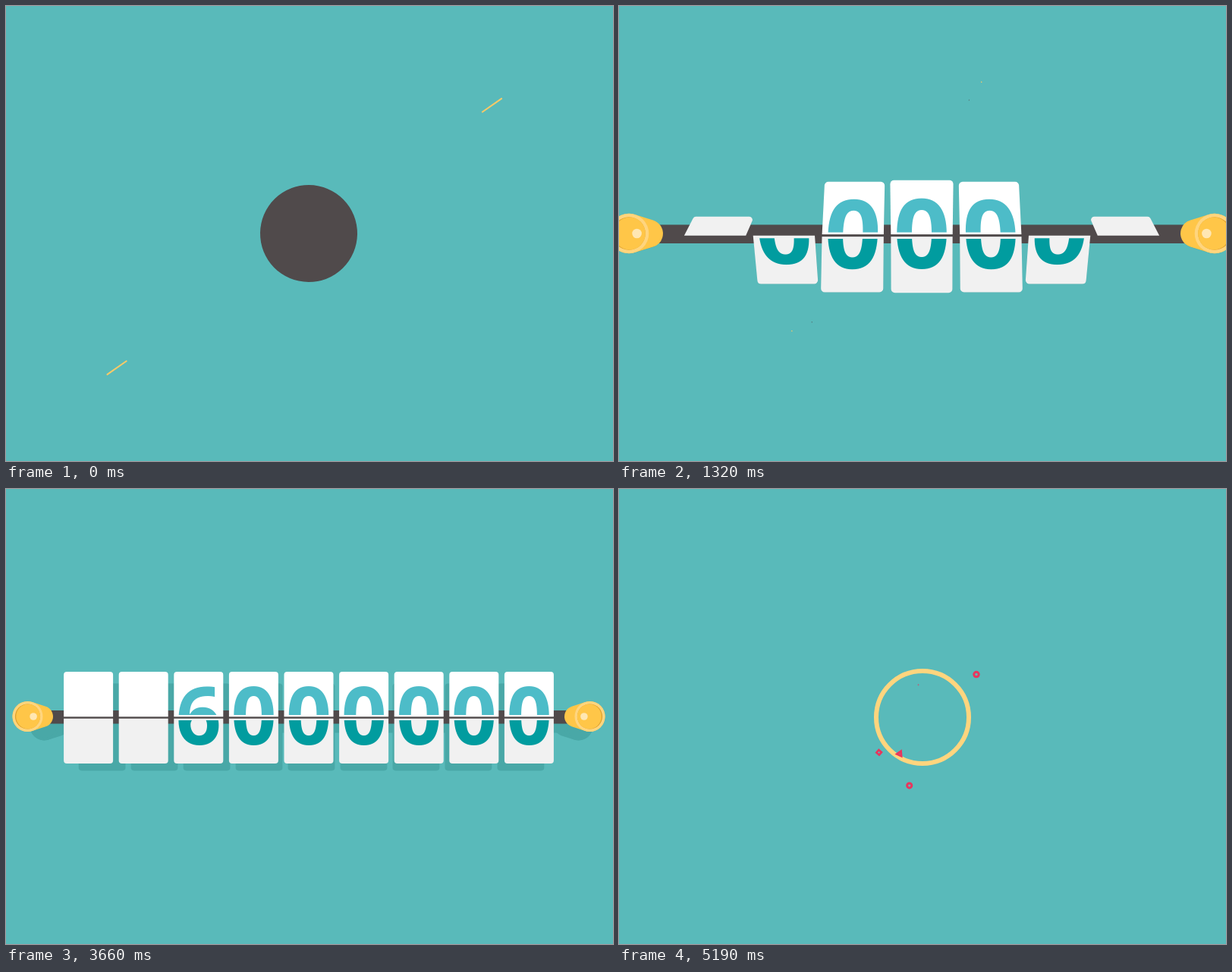
These frames come from a looping animation (800 by 600 pixels, 5.22 s). An HTML page with a canvas:

```html
<!DOCTYPE html>
<html lang="en">
<head>
<meta charset="utf-8">
<title>Flip counter</title>
<style>
html, body { margin: 0; width: 100%; height: 100%; overflow: hidden; background: #59baba; }
canvas { display: block; }
</style>
</head>
<body>
<canvas id="stage" width="800" height="600"></canvas>
<script>
const ctx = document.getElementById('stage').getContext('2d');
const LOOP = 5220, PITCH = 72.6, HALF = 60.5, RAD = Math.PI / 180;
const BG = '#59baba', SHADE = '#49a8a7', DARK = '#504a4b', GOLD = '#ffc648',
      PALE = '#ffd57e', DASH = '#fdca66', PINK = '#e8365d';

const clamp = v => Math.max(0, Math.min(1, v));
const span = (t, a, b) => clamp((t - a) / (b - a));
const outQuad = p => 1 - (1 - p) ** 2;
const inOut = p => (1 - Math.cos(p * Math.PI)) / 2;

// Piecewise linear value from time, value pairs
function key(t, k) {
  if (t <= k[0]) return k[1];
  for (let i = 2; i < k.length; i += 2)
    if (t < k[i]) return k[i - 1] + (k[i + 1] - k[i - 1]) * (t - k[i - 2]) / (k[i] - k[i - 2]);
  return k[k.length - 1];
}

let tint = null;
function fill(color) { ctx.fillStyle = tint || color; ctx.fill(); }
function disc(x, y, r, color) { ctx.beginPath(); ctx.arc(x, y, r, 0, 7); fill(color); }
function poly(points) {
  ctx.beginPath();
  for (let i = 0; i < points.length; i += 2) ctx.lineTo(points[i], points[i + 1]);
  ctx.closePath();
}
// Round-capped line; len includes the caps
function capsule(cx, cy, len, width, angle, color) {
  if (len <= 0) return;
  const w = Math.min(width, len), h = Math.max(.01, (len - w) / 2);
  const dx = Math.cos(angle) * h, dy = Math.sin(angle) * h;
  ctx.beginPath();
  ctx.moveTo(cx - dx, cy - dy);
  ctx.lineTo(cx + dx, cy + dy);
  ctx.lineCap = 'round';
  ctx.lineWidth = w;
  ctx.strokeStyle = tint || color;
  ctx.stroke();
}

// Counter cards
const OPEN_AT = [955, 965, 1130, 1260, 1400];
const OPEN_LOW = [0, 90, 70, 112, 240, 0, 320, -25, 430, 26, 560, 0];
const OPEN_TOP = [200, 90, 280, 56, 400, 0];
const FLIPS = {
  1: [[0, '1'], [2430, '']],
  2: [[0, '0'], [2300, '8'], [3050, '6'], [3800, '4']]
};
const FOUR = [2, -43.5, 18, -43.5, -8, 3, 6.5, 3, 9, -15, 21, -15, 21, 3, 27, 3,
              27, 18, 21, 18, 21, 34.5, 6, 34.5, 6, 18, -26, 18, -26, 5];

function half(i, top, deg, ch) {
  const d = i - 4, x = d * PITCH, cos = Math.cos(deg * RAD), sin = Math.sin(deg * RAD);
  const side = top ? -HALF : HALF, h = side * cos;
  if (Math.abs(h) < .5) return;
  const shear = -(2.2 * d + 3.5 * Math.sign(d)) * sin;
  const flare = (d ? -2.4 / Math.abs(d) : 3) * sin;
  const l = x - 32.5, r = x + 32.5, fl = l + shear - flare, fr = r + shear + flare;
  const round = Math.min(4, Math.abs(h) / 6);
  ctx.beginPath();
  ctx.moveTo(l, 0);
  ctx.arcTo(fl, h, fr, h, round);
  ctx.arcTo(fr, h, r, 0, round);
  ctx.lineTo(r, 0);
  fill(top ? '#fff' : '#f1f1f1');
  if (tint || !ch || cos < 0) return;

  ctx.save();
  ctx.transform(1, 0, shear / side, cos, x, 0);
  ctx.beginPath();
  ctx.rect(-33, top ? -60 : 3.5, 66, 56.5);
  ctx.clip();
  ctx.fillStyle = top ? '#4dbcc8' : '#019c9f';
  if (ch === '4') {
    poly(FOUR);
    ctx.fill();
  } else {
    ctx.font = ch === '1' ? '800 104px "Noto Sans Mono", monospace'
                          : '700 105px "Open Sans", "Noto Sans", sans-serif';
    ctx.textAlign = 'center';
    ctx.fillText(ch, 0, 35);
  }
  ctx.restore();
}

function card(i, t) {
  const age = t - OPEN_AT[Math.abs(i - 4)];
  if (age <= 0) return;
  const seq = FLIPS[i] || [[0, i ? '0' : '']];
  let n = seq.length - 1;
  while (t < seq[n][0]) n--;
  const ch = seq[n][1], f = t - seq[n][0];
  if (n && f < 350) {
    const old = seq[n - 1][1];
    half(i, true, 0, ch);
    if (f < 190) half(i, false, 0, old);
    if (f < 110) half(i, true, 90 * (f / 110) ** 2, old);
    else half(i, false, key(f, [110, 90, 190, 0, 260, 18, 350, 0]), ch);
  } else {
    half(i, true, key(age, OPEN_TOP), ch);
    half(i, false, key(age, OPEN_LOW), ch);
  }
  if (!tint && age > 200) {
    ctx.fillStyle = DARK;
    ctx.fillRect((i - 4) * PITCH - 37, -1.2, 74, 2.4);
  }
}

// Rod end pointing along +x; reach is the length of its neck
function knob(dist, size, turn, reach, glint) {
  ctx.save();
  ctx.rotate(turn);
  ctx.translate(dist, 0);
  ctx.scale(size, size);
  const b = Math.PI - Math.acos(6 / reach);
  ctx.beginPath();
  ctx.arc(0, 0, 20, -b, b);
  ctx.arc(-reach, 0, 14, b, 2 * Math.PI - b);
  ctx.closePath();
  fill(GOLD);
  disc(0, 0, 20, PALE);
  disc(0, 0, 16.6, '#dfa22f');
  ctx.save();
  ctx.beginPath();
  ctx.arc(0, 0, 16.6, 0, 7);
  ctx.clip();
  disc(-1.3, 0, 16.6, GOLD);
  ctx.restore();
  disc(-glint, 0, 4.8, '#ffe7b3');
  ctx.restore();
}

const exitX = t => t < 4495 ? 0 : -820 * ((t - 4495) / 455) ** 2;

function board(t) {
  const zoom = inOut(span(t, 900, 1500));
  const dist = key(t, [60, 0, 600, 277, 1020, 382, 1250, 392, 1500, 370.5]);
  const size = (2.52 - 1.52 * zoom) * outQuad(span(t, 200, 450));
  const width = t < 300 ? 128 - 76 * inOut(span(t, 60, 300)) : 52 - 34.5 * zoom;
  ctx.rotate((215 * outQuad(span(t, -5, 1307)) - 215) * RAD);
  capsule(0, .7 * span(t, 600, 1000), 2 * Math.max(0, dist - 20 * size) + width, width, 0, DARK);
  ctx.save();
  const s = 2.23 - 1.23 * zoom;
  ctx.scale(s, s);
  ctx.translate(0, 4.5 - 3 * zoom);
  for (let i = 0; i < 9; i++) card(i, t);
  ctx.restore();
  if (size > 0) {
    const reach = key(t, [200, 13, 600, 17, 1020, 21.5, 1500, 19.5]);
    for (const turn of [0, Math.PI]) knob(dist, size, turn, reach, 9.6 - 2 * zoom);
  }
}

function boardWithShadow(t) {
  const lift = inOut(span(t, 1300, 1600));
  if (lift > 0) {
    ctx.save();
    tint = SHADE;
    ctx.translate(399 + 3.5 * lift + exitX(t - 65), 300 + 12.5 * lift);
    ctx.scale(1 - .05 * lift, 1 - .05 * lift);
    board(t);
    tint = null;
    ctx.restore();
  }
  ctx.save();
  ctx.translate(399 + exitX(t), 300);
  board(t);
  ctx.restore();
}

// Two thin rays leaving the disc
function rays(t) {
  if (t > 90) return;
  const a = -35 * RAD, outer = 311 + .15 * t, inner = 278 + (outer - 278) * t / 95;
  for (const [r, dir] of [[0, 1], [14, -1]]) {
    const m = ((inner + outer) / 2 + r) * dir;
    capsule(399 + m * Math.cos(a), 300 + m * Math.sin(a), outer - inner, 2, a, DASH);
  }
}

// Dashes orbiting behind the spinning rod
function orbit(t) {
  if (t < 450 || t > 1350) return;
  const turn = -75.6 + 219 * outQuad(span(t, 450, 1350));
  for (const start of [0, 148.2]) {
    const put = (r, lag, len, w, color) => {
      const a = (turn + start - lag) * RAD;
      capsule(399.5 + r * Math.cos(a), 300 + r * Math.sin(a), len, w, a + Math.PI / 2, color);
    };
    put(214.5, 0, key(t, [450, 0, 600, 25, 1020, 17, 1350, 0]), 11.5, DASH);
    put(186.5, 2, key(t, [540, 0, 600, 8, 1020, 12, 1350, 0]), 5, DARK);
  }
}

// Streaks rushing past while the board leaves: x, y, length, thickness
const STREAKS = [[409, 207, 66, 5, DARK], [380, 226.5, 71, 10, DASH],
                 [224.5, 389.5, 76, 15, DARK], [468, 420, 68, 8, DASH]];
function streaks(t) {
  const grow = Math.min(span(t, 4430, 4555), 1 - span(t, 4850, 4990));
  if (grow <= 0) return;
  for (const [x, y, len, w, color] of STREAKS) {
    const pos = (x + 1100 - 1.6 * (t - 4560)) % 1000 - 100;
    capsule(pos, y, len * grow, w * Math.min(1, grow * 2), 0, color);
  }
}

// Confetti: shape (0 circle, otherwise number of corners), dx, dy, size
const FLIP_BITS = [[4, -17, 22, 1.1], [3, 16, 37, 1], [0, 7, 64, 1]];
const END_BITS = [[0, 78, -62, 1.25], [0, -6, -47, .25], [4, -63, 51, 1.1],
                  [3, -33, 53, 1.2], [0, -19, 99, 1.2]];
function burst(x, y, p, bits) {
  if (p <= 0 || p >= 1) return;
  const e = outQuad(p), shrink = Math.min(1, (1 - p) * 2.4);
  for (const [corners, dx, dy, size] of bits) {
    ctx.save();
    ctx.translate(x + dx * e, y + dy * e);
    ctx.scale(size * shrink, size * shrink);
    if (corners) {
      ctx.rotate(p * .6 - .5);
      const pts = [];
      for (let i = 0; i < corners; i++) {
        const a = i * 2 * Math.PI / corners + Math.PI;
        pts.push(4.2 * Math.cos(a), 4.2 * Math.sin(a));
      }
      poly(pts);
    } else {
      ctx.beginPath();
      ctx.arc(0, 0, 3.6, 0, 7);
    }
    // Strokes thicken as the pieces shrink
    ctx.lineWidth = 2.4 / shrink;
    ctx.strokeStyle = PINK;
    ctx.stroke();
    ctx.restore();
  }
}

function ring(t) {
  if (t < 4980) return;
  const p = outQuad(span(t, 4980, 5185));
  ctx.beginPath();
  ctx.arc(400, 301, 61 * p, 0, 7);
  ctx.lineWidth = 6 + 14 * (1 - p) * p;
  ctx.strokeStyle = PALE;
  ctx.stroke();
}

function draw(t) {
  ctx.fillStyle = BG;
  ctx.fillRect(0, 0, 800, 600);
  ctx.save();
  ctx.beginPath();
  ctx.rect(0, 32, 800, 536);
  ctx.clip();
  rays(t);
  orbit(t);
  streaks(t);
  if (t < 4980) boardWithShadow(t);
  for (const [at] of FLIPS[2].slice(1)) burst(221, 330, (t - at - 200) / 350, FLIP_BITS);
  ring(t);
  burst(400, 301, (t - 4960) / 330, END_BITS);
  ctx.restore();
}

const begin = performance.now();
function tick() {
  draw((performance.now() - begin) % LOOP);
  requestAnimationFrame(tick);
}
tick();
</script>
</body>
</html>
```
